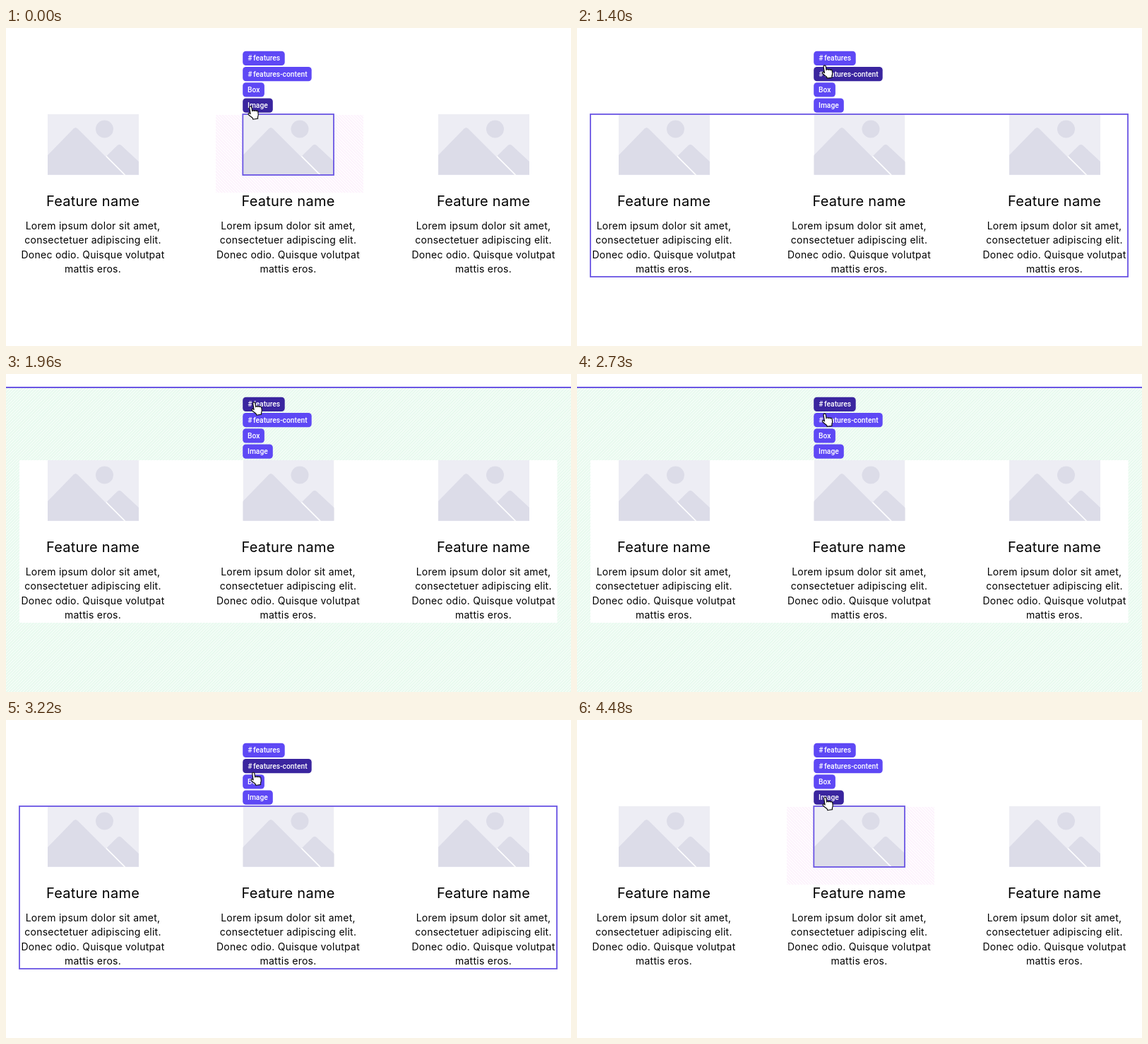
An HTML page for the animation above (4550 ms loop, 800 by 450 pixels).

```html
<!DOCTYPE html>
<html lang="en">
<head>
<meta charset="utf-8">
<title>Element breadcrumbs</title>
<style>
  html, body { margin: 0; width: 100%; height: 100%; overflow: hidden; background: #fff; }
  svg { display: block; }
  #stage { width: 800px; height: 450px; }
  .title { font: 400 20px Inter, sans-serif; letter-spacing: .25px; text-anchor: middle; }
  .body { font: 400 14px Inter, sans-serif; letter-spacing: .26px; text-anchor: middle; }
  .tag rect { fill: #5e48f5; }
  .tag text { fill: #fff; font: 500 10.3px Roboto, sans-serif; }
  .outline { fill: none; stroke: #6a55e4; stroke-width: 1.8; }
  .mark { visibility: hidden; }
  [data-hover="image"] .mark.image,
  [data-hover="box"] .mark.box,
  [data-hover="content"] .mark.content,
  [data-hover="features"] .mark.features { visibility: visible; }
  [data-hover="image"] .tag.image rect,
  [data-hover="box"] .tag.box rect,
  [data-hover="content"] .tag.content rect,
  [data-hover="features"] .tag.features rect { fill: #3a259f; }
</style>
</head>
<body>
<svg id="stage" viewBox="0 0 800 450" data-hover="image">
  <defs>
    <pattern id="green" width="3" height="3" patternUnits="userSpaceOnUse" patternTransform="rotate(45)">
      <rect width="3" height="3" fill="#f5fdf8"/>
      <rect width="1.2" height="3" fill="#e2f8ea"/>
    </pattern>
    <pattern id="pink" width="3" height="3" patternUnits="userSpaceOnUse" patternTransform="rotate(-45)">
      <rect width="3" height="3" fill="#fffdff"/>
      <rect width="1.2" height="3" fill="#fceefb"/>
    </pattern>
    <clipPath id="frame"><rect x="59" y="122" width="129" height="85.7"/></clipPath>
    <g id="card">
      <g clip-path="url(#frame)" fill="#dcdce8">
        <rect x="59" y="122" width="129" height="86" fill="#ededf4"/>
        <circle cx="139.5" cy="143" r="12.5"/>
        <path d="M58 181L95.5 142.5Q98.5 139.5 101.5 142.5L167 208H58z"/>
        <path d="M142.5 181L157.5 166.3Q160.5 163.5 163.5 166.3L189 190V208H169.5z"/>
        <path d="M142 181.5L168.5 208" stroke="#fff" stroke-width="1.2"/>
      </g>
      <text class="title" x="123" y="252">Feature name</text>
      <g class="body">
        <text x="123" y="284.7">Lorem ipsum dolor sit amet,</text>
        <text x="123" y="305.2">consectetuer adipiscing elit.</text>
        <text x="123" y="325.7">Donec odio. Quisque volutpat</text>
        <text x="123" y="346.2">mattis eros.</text>
      </g>
    </g>
  </defs>

  <g class="mark features">
    <path fill="url(#green)" fill-rule="evenodd" d="M0 20H800V450H0zM19 122V352H780.5V122z"/>
    <path class="outline" d="M0 19H800"/>
  </g>
  <rect class="mark image" x="297" y="123" width="209" height="110" fill="url(#pink)"/>

  <use href="#card"/>
  <use href="#card" x="276.5"/>
  <use href="#card" x="553"/>

  <rect class="mark content outline" x="19" y="122" width="761" height="230"/>
  <rect class="mark box outline" x="295.5" y="122" width="208" height="230"/>
  <rect class="mark image outline" x="335.3" y="122" width="128.7" height="86"/>

  <g class="tag features">
    <rect x="335.2" y="32.8" width="59.5" height="20.2" rx="4.5"/>
    <text x="342.3" y="46.4">#</text><text x="350" y="46.4">features</text>
  </g>
  <g class="tag content">
    <rect x="335.2" y="55" width="97.5" height="20.2" rx="4.5"/>
    <text x="342.3" y="68.6">#</text><text x="350" y="68.6">features-content</text>
  </g>
  <g class="tag box">
    <rect x="335.2" y="77.3" width="30.7" height="20.2" rx="4.5"/>
    <text x="342" y="90.9">Box</text>
  </g>
  <g class="tag image">
    <rect x="335.2" y="99.5" width="42.6" height="20.2" rx="4.5"/>
    <text x="342" y="113.1">Image</text>
  </g>

  <g id="cursor">
    <path transform="rotate(-9) translate(-6.6 -1)" fill="#fff" stroke="#111" stroke-width="1.2" stroke-linejoin="round"
      d="M5 11.5V2.6a1.6 1.6 0 0 1 3.2 0V8c.3-1.2 2.7-1.1 2.9.3.5-1 2.5-.8 2.6.6.6-.8 2.3-.4 2.3 1.2v3.4c0 2-1.4 3-1.6 4.8v1.3H7.4v-1.5C6.6 16.3 3.6 14.3 2.2 12c-.8-1.4.7-2.5 1.9-1.6z"/>
  </g>
</svg>
<script>
  const LOOP = 4550, STEP = 70;
  const stage = document.getElementById('stage');
  const cursor = document.getElementById('cursor');

  const smooth = p => p * p * (3 - 2 * p);
  const out = k => p => 1 - (1 - p) ** k;

  const start = { x: 346, y: 111 };
  const moves = [
    { from: 210, to: 630, x: 350, y: 85, ease: smooth },
    { from: 770, to: 1190, x: 350, y: 62, ease: smooth },
    { from: 1330, to: 1890, x: 351, y: 40, ease: out(4) },
    { from: 2450, to: 3010, x: 350, y: 66, ease: out(1.4) },
    { from: 3010, to: 3500, x: 350, y: 87, ease: smooth },
    { from: 3570, to: 4130, x: 351, y: 109.5, ease: smooth }
  ];
  const hovers = [
    [0, 'image'], [490, 'box'], [980, 'content'], [1470, 'features'],
    [2800, 'content'], [3290, 'box'], [3850, 'image']
  ];

  function place(t) {
    let { x, y } = start;
    for (const m of moves) {
      if (t <= m.from) break;
      const p = m.ease(Math.min(1, (t - m.from) / (m.to - m.from)));
      x += (m.x - x) * p;
      y += (m.y - y) * p;
    }
    return `translate(${x} ${y})`;
  }

  function draw(now) {
    const t = Math.floor((now % LOOP) / STEP) * STEP;
    cursor.setAttribute('transform', place(t));
    stage.dataset.hover = hovers.filter(h => h[0] <= t).pop()[1];
    requestAnimationFrame(draw);
  }
  draw(performance.now());
</script>
</body>
</html>
```
